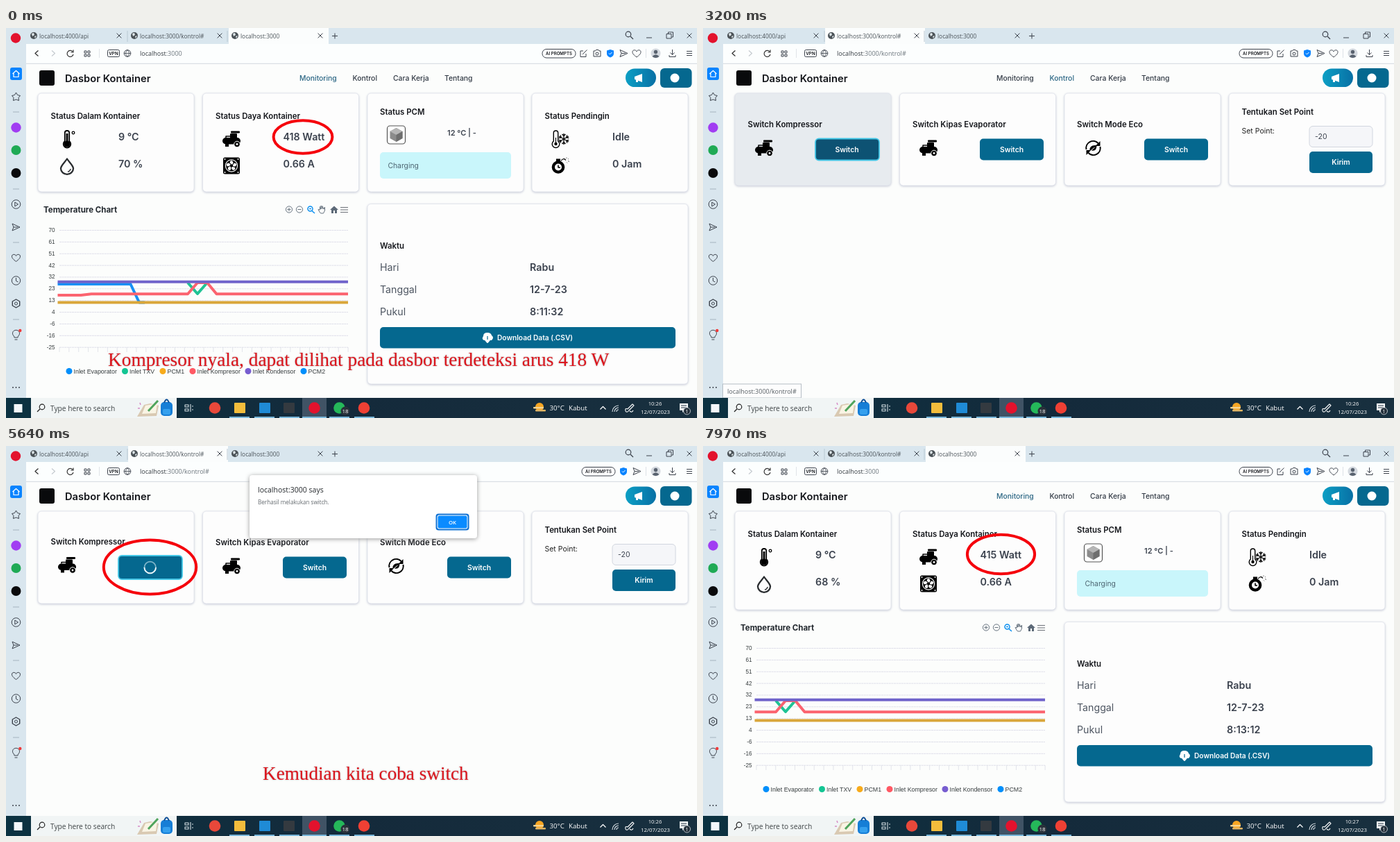
Recreate the animation shown at these times as an HTML page. Size 996 px wide and 562 px high, loop 8000 ms.

```html
<!DOCTYPE html>
<html lang="id">
<head>
<meta charset="utf-8">
<title>Dasbor Kontainer</title>
<style>
html, body { margin: 0; width: 100%; height: 100%; overflow: hidden; background: #fcfdfc; }
svg { display: block; width: 100vw; height: 100vh; }
text { white-space: pre; }
.i { font-family: Inter, sans-serif; }
.m { font-family: Inter, sans-serif; font-weight: 500; }
.b { font-family: Inter, sans-serif; font-weight: 600; }
.o { font-family: "Open Sans", sans-serif; }
.a { font-family: "Liberation Sans", sans-serif; }
.s { font-family: "Liberation Serif", serif; filter: drop-shadow(.6px .8px .8px #b5b0b0); }
.card { filter: drop-shadow(0 1px 1.5px #c9ccd9); }
.dialog { filter: drop-shadow(0 1px 3px #999); }
</style>
</head>
<body>
<svg id="stage" viewBox="0 0 996 562" preserveAspectRatio="none"></svg>
<script>
const LOOP = 8000;
const CUT = { control: 2500, back: 7500 };
const TEAL = '#05688f', INK = '#15171c', GREY = '#3c424c', RED = '#f5000c';

// markup helpers
const text = (x, y, str, cls, size, fill = INK, more = '') =>
  `<text x="${x}" y="${y}" class="${cls}" font-size="${size}" fill="${fill}" ${more}>${str}</text>`;
const mid = (x, y, str, cls, size, fill, more = '') => text(x, y, str, cls, size, fill, `text-anchor="middle" ${more}`);
const rect = (x, y, w, h, fill, r = 0, more = '') =>
  `<rect x="${x}" y="${y}" width="${w}" height="${h}" rx="${r}" fill="${fill}" ${more}/>`;
const disc = (x, y, r, fill, more = '') => `<circle cx="${x}" cy="${y}" r="${r}" fill="${fill}" ${more}/>`;
const line = (d, col = GREY, w = 1, more = '') =>
  `<path d="${d}" fill="none" stroke="${col}" stroke-width="${w}" stroke-linejoin="round" ${more}/>`;
const ring = (x, y, r, col = GREY, w = 1) => disc(x, y, r, 'none', `stroke="${col}" stroke-width="${w}"`);
const shape = (d, fill = '#000') => `<path d="${d}" fill="${fill}"/>`;
const at = (x, y, body, more = '') => `<g transform="translate(${x} ${y})" ${more}>${body}</g>`;
const group = (id, body) => `<g id="${id}">${body}</g>`;
const oval = (x, y, rx, ry, id) =>
  `<ellipse id="${id}" cx="${x}" cy="${y}" rx="${rx}" ry="${ry}" fill="none" stroke="${RED}" stroke-width="4"/>`;
const each = (list, fn) => list.map(fn).join('');

// small icons, all centred on 0,0
const globe = disc(0, 0, 5, '#4b5257') + shape('M-3-3L0-4L1-1L-2 1ZM1 1L4 0L2 4Z', '#dfe7ea');
const wire = ring(0, 0, 4.8) + line('M-4.8 0H4.8M0-4.8Q-5 0 0 4.8Q5 0 0-4.8', GREY, .8);
const cross = line('M-3.4-3.4L3.4 3.4M3.4-3.4L-3.4 3.4');
const heart = line('M0 5C-4 2-6 0-6-2.4C-6-6-1-6 0-3C1-6 6-6 6-2.4C6 0 4 2 0 5Z');
const plane = line('M-5-5L6 0L-5 5L-3 0ZM-3 0H3');
const magnifier = col => ring(1, -1, 3.8, col, 1.2) + line('M-2 2L-6 6', col, 1.3);
const bars = (w, gap) => line(`M${-w} ${-gap}H${w}M${-w} 0H${w}M${-w} ${gap}H${w}`, GREY, 1.2);
const house = shape('M-6 0L0-5.5L6 0H4V5H1V1H-1V5H-4V0Z', '#5d6a78');

const compressor =
  rect(-13, -2, 26, 9.5, '#000', 4.7) + rect(-2, -8, 10, 7, '#000', 1) + rect(-1, -11.5, 13, 3, '#000', 1) +
  line('M-8-2V-4H-2', '#000', 1.5) + rect(-9, 6, 5, 5, '#000') +
  disc(8, 7.5, 4.3, '#000', 'stroke="#fcfdfc"') + disc(8, 7.5, 1.4, '#fff');
const flask = (fill, w) =>
  `<path d="M-3.2 3V-9Q-3.2-12 0-12Q3.2-12 3.2-9V3A5.3 5.3 0 1 1-3.2 3Z" fill="${fill}" stroke="#000" stroke-width="${w}"/>`;
const thermometer = flask('#fff', 1.8) + disc(0, 7, 4.6, '#000') + line('M0-8V6', '#000', 2.8) + ring(9, -9, 1.8, '#000', 1.3);
const drop = line('M0-10.5C3.5-5 9-1 9 3.5A9 8.3 0 0 1-9 3.5C-9-1-3.5-5 0-10.5Z', '#2a2d30', 2.3) + line('M5 4Q4.5 7.5 1 8', '#2a2d30', 1.5);
const fan = rect(-12, -12, 24, 24, '#000', 2.5) + disc(0, 0, 9.2, '#fff') + disc(0, 0, 8, '#000') +
  each([0, 1, 2, 3, 4], k => `<path d="M0-2Q-5-6 0-7.5Q4-6 1.5-2Z" fill="#fff" transform="rotate(${k * 72})"/>`) +
  each([[-9.5, -9.5], [9.5, -9.5], [-9.5, 9.5], [9.5, 9.5]], p => disc(p[0], p[1], 1, '#fff'));
const cube = rect(-13, -13, 26, 26, '#fff', 4, 'stroke="#555" stroke-width="1.2"') +
  shape('M0-10L9-5V5L0 10L-9 5V-5Z', '#8b8b8b') + shape('M0-10L9-5L0 0L-9-5Z', '#b5b5b5') + shape('M0 0L9-5V5L0 10Z', '#6e6e6e');
const frost = at(-6.5, 0, flask('#fff', 1.4) + disc(0, 7, 2.2, '#000') + line('M0-2V6', '#000', 1.2)) +
  each([0, 60, 120], a => line('M0-8V8M-2.5-7L0-4.5L2.5-7M-2.5 7L0 4.5L2.5 7', '#000', 1.3, `transform="translate(5 0) rotate(${a})"`));
const bomb = disc(-3, 3, 9.3, '#000') + disc(-3, 3, 5, '#fff') + line('M-3 0V3.5H0', '#000', 1.6) +
  rect(-6, -9, 6, 4, '#000') + line('M1-6Q4-11 8-7', '#000', 1.2) +
  line('M9-11V-9.5M12-9L11-8.5M13-5L11-6M6-10L7-9M9-4L10-3', '#555', .9);
const eco = line('M-10 2A10 10 0 0 1 7-7M10-2A10 10 0 0 1-7 7', '#000', 2) +
  shape('M10-10V-3H3ZM-10 10V3H-3Z') + shape('M-5 4Q-6-5 5-4Q5 6-4 3Z') + line('M-5 5L2-1', '#fff', 1);
const megaphone = shape('M-6-2L5-6V6L-6 2Z', '#fff') + rect(-4, 2, 3, 4, '#fff');

const card = (x, y, w, h, id = '') =>
  `<g class="card">${rect(x, y, w, h, '#fdfdfd', 5, `id="${id}" stroke="#dfe2ea" stroke-width=".8"`)}</g>`;
const button = (x, y, w, label) => rect(x, y, w, 31, TEAL, 5) + mid(x + w / 2, y + 19.2, label, 'b', 10.4, '#fff');

// browser window
const tab = (x, label, id) => rect(x - 17, 0, 144, 23, '#fbfdfd', 0, `id="${id}"`) +
  at(x - 8, 11, globe) + text(x, 15, label, 'o', 8.35, '#4a5258') + at(x + 115, 11, cross);

function browser() {
  return rect(0, 0, 996, 562, '#fcfdfc') + rect(0, 0, 996, 23, '#d9e6ee') +
    tab(48, 'localhost:4000/api', 'tab0') + tab(193, 'localhost:3000/kontrol#', 'tab1') + tab(338, 'localhost:3000', 'tab2') +
    line('M175 4V20M319 4V20', '#b9c8d2') + line('M470 11.5H478M474 7.5V15.5') +
    at(898, 10, `<g transform="scale(-1 1)">${magnifier(GREY)}</g>`) +
    line('M923 14H931M952 8.5H959V15H952ZM954.5 8V6H961.5V13H959.5') + at(985, 11, cross) +
    rect(29, 23, 967, 28, '#fcfefe') + line('M29 51.3H996', '#d3d9df') +
    line('M46.5 32.5L42 36.5L46.5 40.5', '#333', 1.3) + line('M66 32.5L70.5 36.5L66 40.5', '#c5cbd0', 1.2) +
    line('M96 34A4.5 4.5 0 1 0 97 38M97 31.5V35H93.5', '#333', 1.2) +
    line('M113 33H116V36H113ZM118 33H121V36H118ZM113 38H116V41H113ZM118 38H121V41H118Z') + line('M134.5 30V43', '#e0e4e8') +
    rect(146.5, 31.5, 17, 10, 'none', 2, `stroke="${GREY}"`) + mid(155, 39.3, 'VPN', 'b', 6.3) + at(175, 36.5, wire) +
    `<text x="193" y="40" class="o" font-size="9" fill="#343a40">localhost<tspan fill="#6b747b" id="url"></tspan></text>` +
    group('pill', rect(773, 30.5, 48, 12.5, '#fff', 6, `stroke="${GREY}"`) + mid(797, 39, 'AI PROMPTS', 'b', 6.1)) +
    group('extras', line('M836 37V41.5H828V33H832M831 38L837.5 31.5') +
      line('M847 33H849.5L850.5 31.5H854L855 33H857V41H847Z') + ring(852, 37, 2) + at(909, 37, heart)) +
    group('shield', shape('M871 31L876 32.5V37Q876 40.5 871 42.5Q866 40.5 866 37V32.5Z', '#0a84ff') + line('M869 36.5L870.5 38L873.5 35', '#fff')) +
    group('send', at(890, 36.5, plane)) + line('M922.5 30V43', '#dde2e7') +
    disc(936.5, 36.5, 7, '#d5dae0') + disc(936.5, 34.5, 2.7, '#59636f') + shape('M931.5 41Q936.5 35.5 941.5 41Q936.5 45 931.5 41Z', '#59636f') +
    line('M960.5 31V38M957.5 35.5L960.5 38.5L963.5 35.5M956 39V41.5H965V39') + at(985, 36.5, bars(4, 3));
}

function sidebar() {
  return rect(0, 0, 29, 533, '#d9e6ee') + disc(14, 14.5, 7.2, '#e3122d') +
    rect(6, 57, 17, 18, '#0a84ff', 3) + line('M9.5 66L14.5 61.5L19.5 66M11 65V70.5H18V65', '#fff', 1.2) +
    line('M14.5 93L16.5 96.5L20.5 97.5L18 100.5L18.5 104.5L14.5 103L10.5 104.5L11 100.5L8.5 97.5L12.5 96.5Z') +
    each([121, 232, 309, 420], y => line(`M10 ${y}H19`, '#a5b4bf')) +
    disc(14.5, 143.5, 7.2, '#a13df2') + disc(14.5, 176, 7, '#1faa55') + disc(14.5, 209, 7, '#0a0a0c') +
    ring(14.5, 254, 6.3) + line('M12.8 251V257L17.5 254Z') + at(14, 287, plane) + at(14.5, 331.5, heart) +
    ring(14.5, 364, 6.2) + line('M14.5 360V364.5L17.5 366') +
    line('M14.5 391L19.7 394V400L14.5 403L9.3 400V394Z', GREY, 1.4) + ring(14.5, 397, 2) +
    line('M12 446C12 443 9 443 9.5 439.5C10 434 19 434 19.5 439.5C20 443 17 443 17 446ZM12.5 449H16.5') + disc(20.3, 436, 2.2, '#f03a3a') +
    each([10, 14.5, 19], x => disc(x, 518, 1, GREY));
}

function header() {
  const nav = [[423, 'Monitoring', 'navA'], [499.5, 'Kontrol', 'navB'], [558, 'Cara Kerja', ''], [632, 'Tentang', '']];
  return rect(48, 61, 22, 22, '#090a0c', 3) + text(85, 77.5, 'Dasbor Kontainer', 'b', 14.7) +
    each(nav, n => text(n[0], 76, n[1], 'm', 10.4, '#333b46', `id="${n[2]}"`)) +
    rect(893, 58.5, 44, 26.5, 'url(#sky)', 13.2) + at(912, 72, megaphone) +
    rect(943, 58, 45.5, 28, TEAL, 6) + disc(964, 72, 6.5, '#fff');
}

// pages
function chart() {
  const ys = k => 291.5 + k * 16.87;
  const labels = [70, 61, 51, 42, 32, 23, 13, 4, -6, -16, -25];
  const legend = [[91, 'Inlet Evaporator', '#008ffb'], [171.5, 'Inlet TXV', '#13c593'], [226, 'PCM1', '#f7ab1b'],
    [269, 'Inlet Kompresor', '#ff5964'], [349, 'Inlet Kondensor', '#775dd0'], [429, 'PCM2', '#008ffb']];
  const icon = '#66727e';
  return text(54, 265.7, 'Temperature Chart', 'i', 11.5, '#23292f', 'font-weight="700"') +
    ring(408, 261.5, 4.6, icon) + line('M405.5 261.5H410.5M408 259V264', icon) +
    ring(423, 261.5, 4.6, icon) + line('M420.5 261.5H425.5', icon) +
    ring(438.5, 260.5, 3.5, '#0a8ff0', 1.5) + line('M441 263.5L445 267M437 260.5H440', '#0a8ff0', 1.5) +
    line('M452 265L450 261.5L452.5 262V257.5L454 261V256L456 260.5V256.5L458 261L459.5 258V263L457.5 267H453.5Z', icon) +
    at(473, 262, house) + at(487.5, 262, bars(5.5, 3.5), 'opacity=".75"') +
    each(labels, (v, k) => text(70.5, ys(k) + 2.5, v, 'a', 8.2, '#373d3f', 'text-anchor="end"') +
      line(`M77 ${ys(k)}H493`, '#dcdce8', .9, 'stroke-dasharray="3 .6"')) +
    each([...Array(31).keys()], k => line(`M${77 + k * 13.87} 460V467`, '#dcdfe6', .8)) +
    `<g clip-path="url(#plot)"><g id="series">` +
    line('M60 369H179.5L192 395.5H200', '#168ff5', 4) +
    line('M262 367L276 383L290 367', '#1fc394', 4) + line('M60 395.5H660', '#d9a63a', 4) +
    line('M60 385H108L123 383.3H262L276 367H290L303.5 383.3H660', '#fb636f', 4) +
    line('M60 365.7H660', '#7064cb', 4) + `</g></g>` +
    each(legend, l => disc(l[0], 494.5, 4.5, l[2]) + text(l[0] + 6.5, 497.7, l[1], 'a', 8.85, '#373d3f'));
}

function monitoring() {
  const big = (x, y, str, id = '') => text(x, y, str, 'b', 14.3, '#3b424e', `id="${id}"`);
  const info = [['Hari', 'Rabu', ''], ['Tanggal', '12-7-23', ''], ['Pukul', '8:11:32', 'time']];
  return each([46, 283.5, 521, 758], x => card(x, 94, 225, 142)) +
    text(64.5, 131, 'Status Dalam Kontainer', 'b', 11.4) + at(88, 160, thermometer) + at(88, 199, drop) +
    big(162, 162, '9 °C') + big(162, 200.5, '70 %', 'humid') +
    text(302, 131, 'Status Daya Kontainer', 'b', 11.4) + at(325, 160, compressor) + at(325, 198.5, fan) +
    big(399.5, 162, '418 Watt', 'watt') + big(399.5, 200.5, '0.66 A') +
    text(539, 125, 'Status PCM', 'b', 11.4) + at(562.5, 154, cube) + text(636, 154.5, '12 °C | -', 'b', 11, '#3b424e') +
    rect(539, 179, 189, 38, '#c9f6fb', 5) + text(550.5, 202, 'Charging', 'i', 10.3, '#4c6470') +
    text(776.5, 131, 'Status Pendingin', 'b', 11.4) + at(799, 160, frost) + at(799, 197.5, bomb) +
    big(874, 162, 'Idle') + big(874, 200.5, '0 Jam') + chart() + card(521, 253.5, 462, 259.5) +
    text(539, 318, 'Waktu', 'b', 11.4) +
    each(info, (r, k) => text(539, 349.5 + k * 32.2, r[0], 'i', 14.2, '#4d5561') + big(755, 349.5 + k * 32.2, r[1], r[2])) +
    rect(539, 431, 426, 30.5, TEAL, 5) + shape('M689 450Q685 448 688 444Q688 439 694 439Q699 439 700 443Q704 446 700 450Z', '#fff') +
    line('M694 444V452M691 449.5L694 453L697 449.5', '#fff', 2) + line('M694 444V449', TEAL, 1.2) +
    text(708, 450.2, 'Download Data (.CSV)', 'b', 10.2, '#fff') +
    oval(428, 157, 42.4, 23.8, 'mark') +
    group('caption1', text(147, 486.5, 'Kompresor nyala, dapat dilihat pada dasbor terdeteksi arus 418 W', 's', 27.35, '#dc141c'));
}

function control() {
  return card(46, 94, 225, 133, 'card1') + each([283.5, 521, 758], x => card(x, 94, 225, 133)) +
    group('head1', text(64.5, 143.2, 'Switch Kompressor', 'b', 11.4) + at(88, 173, compressor)) +
    `<rect id="btn" x="162" width="92" rx="5" y="159.5" height="31"/>` +
    group('label', mid(207.5, 178.7, 'Switch', 'b', 10.4, '#fff')) +
    group('spin', ring(0, 0, 8.3, '#7fb4c8', 1.8) + line('M0-8.3A8.3 8.3 0 0 1 0 8.3', '#eef7fa', 1.8)) +
    text(302, 143.2, 'Switch Kipas Evaporator', 'b', 11.4) + at(325, 173, compressor) + button(399, 159.5, 92, 'Switch') +
    text(539, 143.2, 'Switch Mode Eco', 'b', 11.4) + at(562.5, 173, eco) + button(636, 159.5, 92, 'Switch') +
    text(776.5, 125, 'Tentukan Set Point', 'b', 11.4) + text(776.5, 152, 'Set Point:', 'i', 10.5, '#222') +
    rect(874, 141.5, 91, 30, '#f5f6f9', 5, 'stroke="#d2d6df"') + text(882, 160, '-20', 'i', 10.5, '#3b424e') + button(874, 178, 91, 'Kirim') +
    oval(207.5, 174.5, 66.7, 39, 'circled') +
    group('caption2', text(370, 480.5, 'Kemudian kita coba switch', 's', 27.2, '#dc141c'));
}

function taskbar() {
  const round = [[301, '#e8483a'], [444.5, '#e3122d'], [480.5, '#25b85a'], [516, '#ef4034']];
  const square = [[337, '#f3bd3c'], [373, '#1f8bd6'], [408, '#343a40']];
  return rect(0, 533, 996, 29, 'url(#bar)') + rect(11.5, 542, 12, 12, '#f4f8fa') + rect(36, 533, 210, 29, '#f1f5f5') +
    at(51, 547, magnifier('#222')) + text(64, 551.5, 'Type here to search', 'o', 10.2, '#3e4446') +
    shape('M189 560L199 543L208 541L220 544L217 559Z', '#d9c9b2') + shape('M196 556L201 544L218 541L216 555Z', '#f9f4e4') +
    line('M205 552L219 537', '#4fa45c', 3) + line('M193 540L194 543M190 548H193', '#d58bc5', 1.5) +
    rect(223, 539, 17, 20, '#167ed6', 5) + line('M228 540Q231.5 531 235 540', '#0e4f97', 2) + rect(226, 549, 11, 8, '#35a0ee', 2) +
    line('M258 543H263V546H258ZM258 549H263V552H258ZM266 542V553M268 545H270M268 550H270', '#d5e0e4', 1.1) +
    rect(427, 533, 35, 29, '#405365') +
    each(round, p => disc(p[0], 547.5, 8.3, p[1])) + each(square, p => rect(p[0] - 8, 540, 16, 15, p[1], 1)) +
    each([322, 358, 394, 427, 466, 502], x => rect(x, 560, x === 427 ? 35 : 29, 2, '#79b7da')) +
    disc(489, 552, 6.5, '#29313a') + mid(489, 555, '18', 'o', 8, '#fff') +
    disc(769, 546, 6, '#f7a623') + rect(760, 546, 15, 2.5, '#f6d491', 1) + rect(763, 550, 15, 2.5, '#e4b663', 1) +
    text(783.5, 551.3, '30°C', 'o', 9.7, '#fff') + text(811, 551.3, 'Kabut', 'o', 9.7, '#fff') +
    line('M856.5 549.5L860.5 545.5L864.5 549.5', '#fff', 1.2) +
    line('M874 553A9 9 0 0 1 883 544M877 553A6 6 0 0 1 883 547M880 553A3 3 0 0 1 883 550', '#d7dee3', 1.2) +
    line('M893 552Q892 547 896 549L903 542L905 544L898 551Q895 555 893 552M899 552Q902 555 904 551', '#fff', 1.1) +
    mid(935.5, 543.5, '10:26', 'o', 7.7, '#fff', 'id="clock"') + mid(936, 556, '12/07/2023', 'o', 7.9, '#fff') +
    shape('M971 541H983V551H978L975 554V551H971Z', '#f2f5f6') + line('M973 544H981M973 547H981', '#243544') +
    disc(981.5, 552, 5, '#26323d', 'stroke="#d6dde2" stroke-width=".8"') + mid(981.5, 555, '1', 'o', 7.5, '#fff');
}

const dialog = () => rect(351, 42, 328, 91, '#fff', 4, 'class="dialog"') +
  text(363, 66.5, 'localhost:3000 says', 'o', 10.5, '#24282c') + text(363, 84, 'Berhasil melakukan switch.', 'o', 8.15, '#63696e') +
  rect(619.5, 97.5, 48, 24, '#1474d4', 4) + rect(621.5, 99.5, 44, 20, '#fff', 3) + rect(622.5, 100.5, 42, 18, '#0a8bff', 2) +
  mid(643.5, 112.5, 'OK', 'o', 7.8, '#fff', 'font-weight="600"');

const stage = document.getElementById('stage');
stage.innerHTML = `<defs>
  <linearGradient id="sky"><stop stop-color="#0c9fc4"/><stop offset="1" stop-color="#0870a5"/></linearGradient>
  <linearGradient id="bar"><stop stop-color="#0c3241"/><stop offset=".5" stop-color="#142a3b"/><stop offset="1" stop-color="#18303f"/></linearGradient>
  <clipPath id="plot"><rect x="74.5" y="285" width="418.5" height="180"/></clipPath></defs>` +
  browser() + header() + group('monitor', monitoring()) + group('control', control()) + sidebar() +
  group('status', rect(28.5, 513, 83, 20, '#fdfdfd', 0, 'id="statusBox" stroke="#b5bdc5"') + text(35, 526.5, '', 'o', 9, '#555c62', 'id="statusText"')) +
  taskbar() + group('dialog', dialog());

const el = {};
stage.querySelectorAll('[id]').forEach(n => { el[n.id] = n; });
const show = (id, on) => el[id].setAttribute('display', on ? 'inline' : 'none');
const set = (id, attrs) => { for (const k in attrs) el[id].setAttribute(k, attrs[k]); };
const label = (id, str) => { if (el[id].textContent !== str) el[id].textContent = str; };
const within = (t, a, b) => t >= a && t < b;

function draw(t) {
  const ctl = within(t, CUT.control, CUT.back), late = t >= CUT.back;
  show('monitor', !ctl);
  show('control', ctl);
  show('tab0', false);
  show('tab1', ctl);
  show('tab2', !ctl);
  label('url', ctl ? ':3000/kontrol#' : ':3000');
  set('navA', { fill: ctl ? '#333b46' : '#2b6684' });
  set('navB', { fill: ctl ? '#2b6684' : '#333b46' });

  label('humid', late ? '68 %' : '70 %');
  label('watt', late ? '415 Watt' : '418 Watt');
  label('time', late ? '8:13:12' : '8:11:32');
  label('clock', late ? '10:27' : '10:26');
  show('caption1', !late);
  set('mark', late ? { cx: 429.5, cy: 156, rx: 48.6, ry: 28.2 } : { cx: 428, cy: 157, rx: 42.4, ry: 23.8 });
  set('series', { transform: `translate(${late ? -157 : -4.6 * Math.min(1, t / 2040)} 0)` });

  const hover = within(t, 2950, 3380), busy = within(t, 3380, 6400), asked = within(t, 5250, 6250);
  set('card1', { fill: hover ? '#e7ebef' : '#fdfdfd' });
  set('head1', { transform: `translate(0 ${busy ? -1.5 : 0})` });
  set('btn', {
    y: busy ? 158 : 159.5, height: busy ? 34 : 31,
    fill: hover ? '#0d5273' : TEAL, stroke: hover || busy ? '#43c6e6' : 'none', 'stroke-width': 1.8
  });
  show('label', !busy);
  show('spin', busy);
  set('spin', { transform: `translate(207.7 175) rotate(${Math.min(t, 5250) * .36 % 360})` });
  show('circled', within(t, 3500, 6400));
  show('caption2', t >= 3500);

  show('dialog', asked);
  show('extras', !asked);
  set('pill', { transform: `translate(${asked ? 57 : 0} 0)` });
  for (const id of ['shield', 'send']) set(id, { transform: `translate(${asked ? 19 : 0} 0)` });

  show('status', within(t, 1850, 3380));
  label('statusText', ctl ? 'localhost:3000/kontrol#' : 'localhost:3000/#');
  set('statusBox', { width: ctl ? 113 : 83 });
}

function tick(now) {
  draw(now % LOOP);
  requestAnimationFrame(tick);
}
draw(0);
requestAnimationFrame(tick);
</script>
</body>
</html>
```
